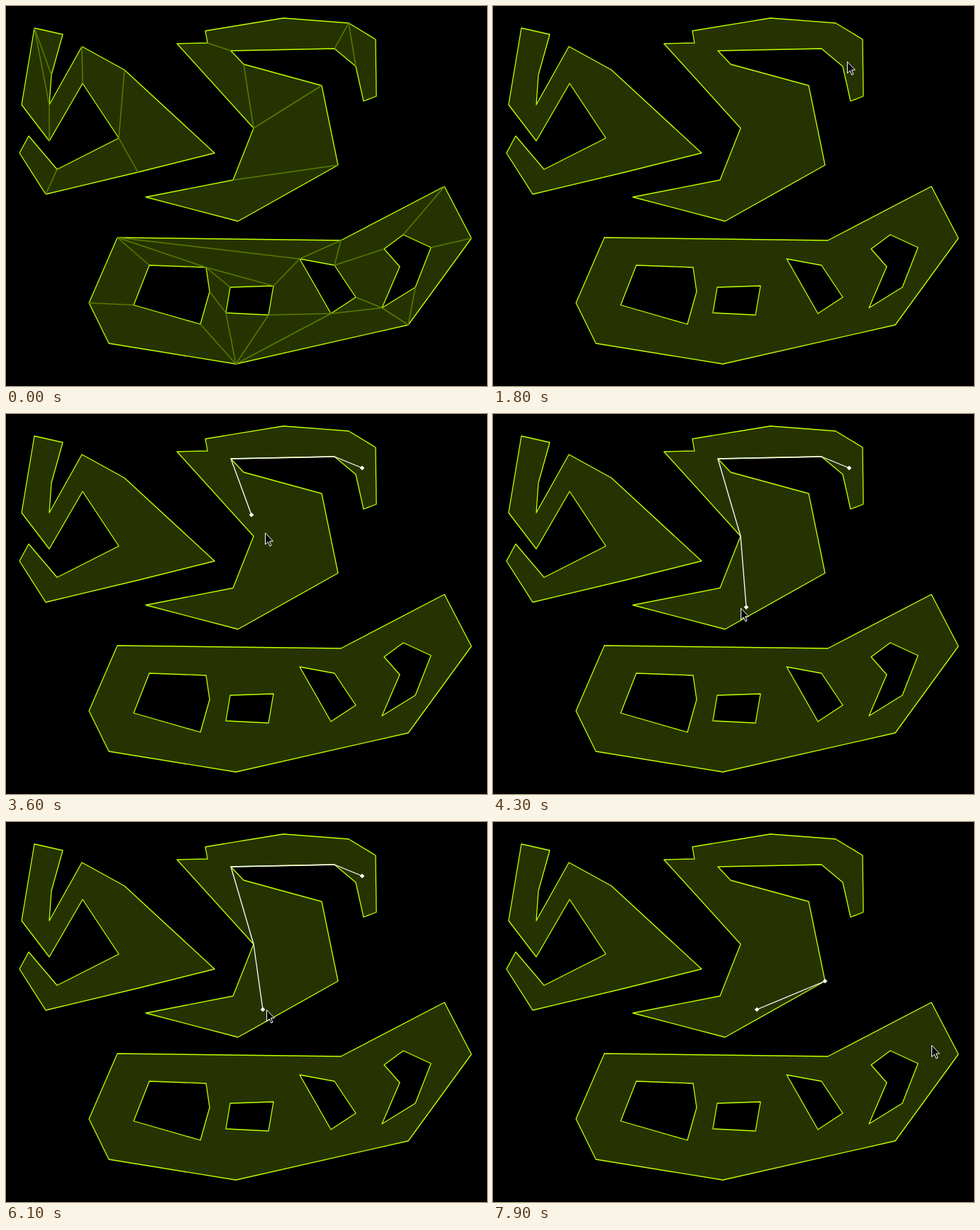
An HTML page that plays this animation: 678x535 px, repeating every 8 s.

```html
<!DOCTYPE html>
<html lang="en">
<head>
<meta charset="utf-8">
<title>Navigation mesh</title>
<style>
  html, body { margin: 0; width: 100%; height: 100%; overflow: hidden; background: #000; }
  svg { display: block; width: 678px; height: 535px; }
  #areas { fill: #263300; fill-rule: evenodd; stroke: #bfff00; stroke-width: 1.3; stroke-linejoin: round; }
  #seams { fill: none; stroke: #5a7c02; stroke-width: 1.5; }
  #route { fill: none; stroke: #fff; stroke-width: 1.3; stroke-linejoin: round; }
  .dot { fill: #fff; }
  #cursor { fill: #000; stroke: #fff; stroke-linejoin: round; }
</style>
</head>
<body>
<svg viewBox="0 0 678 535">
  <rect width="678" height="535"/>
  <path id="areas"/>
  <path id="seams"/>
  <path id="route"/>
  <path class="dot" id="from" d="M0-3.3L3.3 0 0 3.3-3.3 0Z"/>
  <path class="dot" id="to" d="M0-3.3L3.3 0 0 3.3-3.3 0Z"/>
  <path id="cursor" d="M.5.5V16.7L4.2 13.1 6.8 19 9 18 6.5 12.1H11.4Z"/>
</svg>
<script>
const STEP = 100, STEPS = 80;
const $ = id => document.getElementById(id);
const parse = s => s.split(' ').map(p => p.split(',').map(Number));
const line = pts => 'M' + pts.map(p => p.map(v => +v.toFixed(2)).join(' ')).join('L');

// Each area: outline and holes, then seams that name its points by letter.
const LETTERS = 'abcdefghijklmnopqrstuvwxyzA';
const areas = [
  ['40,31 80,40 64,97 61,139 107,57 167,90 294,207 186,234 56,265 19,207 32,183 72,230 159,186 108,109 61,190 22,139',
    'cado en fmh li'],
  ['241,53 284,52 281,35 391,17 483,24 521,47 522,127 504,134 493,85 463,60 317,63 335,82 445,112 468,224 327,303 197,269 320,245 349,172',
    'bk jei lrm qn'],
  ['157,326 472,330 618,254 656,327 567,449 324,504 145,475 117,418|202,365 282,368 287,402 274,448 180,421|316,396 377,394 370,435 310,432|414,356 463,365 493,410 458,433|560,322 599,340 577,396 530,425 555,367 533,342',
    'iajora jn kqfl fpuf rbsA vc wd xeyt uy hm'],
].map(([shape, seams]) => ({ rings: shape.split('|').map(parse), seams: seams.split(' ') }));
const named = (area, word) => [...word].map(c => area.rings.flat()[LETTERS.indexOf(c)]);

$('areas').setAttribute('d', areas.flatMap(a => a.rings.map(r => line(r) + 'Z')).join(''));
$('seams').setAttribute('d', areas.flatMap(a => a.seams.map(w => line(named(a, w)))).join(''));

const bend = areas[1].rings[0];
const edges = bend.map((p, i) => [p, bend[(i + 1) % bend.length]]);
const corners = named(areas[1], 'jkrq');

// pointer keys: step, x, y
const keys = parse('12,657,149 15,552,101 18,499,78 20,502,76 22,502,76 28,332,30 29,310,34 31,272,46 35,346,142 40,424,255 42,357,272 43,349,273 48,322,201 49,239,250 51,239,250 54,270,261 60,362,264 63,372,264 72,372,264 75,488,279 78,618,314');

const lerp = (a, b, t) => a + (b - a) * t;
const mix = (p, q, t) => [lerp(p[0], q[0], t), lerp(p[1], q[1], t)];
const dist = (p, q) => Math.hypot(p[0] - q[0], p[1] - q[1]);

const slope = (i, axis) => keys[i] && keys[i + 1]
  ? (keys[i + 1][axis] - keys[i][axis]) / (keys[i + 1][0] - keys[i][0]) : 0;

// speed at a key: harmonic mean of both sides, zero at rests and turns
function speed(i, axis) {
  const a = slope(i - 1, axis), b = slope(i, axis);
  return a * b > 0 ? 2 * a * b / (a + b) : 0;
}

function pointer(n) {
  const i = keys.findLastIndex(k => k[0] <= n);
  if (i < 0) return keys[0].slice(1);
  if (i === keys.length - 1) return keys[i].slice(1);
  const a = keys[i], b = keys[i + 1], h = b[0] - a[0], t = (n - a[0]) / h;
  return [1, 2].map(k => lerp(a[k], b[k], t * t * (3 - 2 * t))
    + h * t * (1 - t) * ((1 - t) * speed(i, k) - t * speed(i + 1, k)));
}

function inside([x, y]) {
  return edges.reduce((hit, [a, b]) =>
    (a[1] > y) !== (b[1] > y) && x < lerp(a[0], b[0], (y - a[1]) / (b[1] - a[1])) ? !hit : hit, false);
}

// nearest point of the area
function clamp(p) {
  if (inside(p)) return p;
  const nearest = edges.map(([a, b]) => {
    const dx = b[0] - a[0], dy = b[1] - a[1];
    const t = ((p[0] - a[0]) * dx + (p[1] - a[1]) * dy) / (dx * dx + dy * dy);
    return mix(a, b, Math.min(1, Math.max(0, t)));
  });
  return nearest.reduce((m, q) => dist(p, q) < dist(p, m) ? q : m);
}

function crosses(p, q, [a, b]) {
  const rx = q[0] - p[0], ry = q[1] - p[1], sx = b[0] - a[0], sy = b[1] - a[1];
  const den = rx * sy - ry * sx;
  if (Math.abs(den) < 1e-3) return false;
  const ox = a[0] - p[0], oy = a[1] - p[1];
  const within = t => t > 1e-4 && t < 1 - 1e-4;
  return within((ox * sy - oy * sx) / den) && within((ox * ry - oy * rx) / den);
}

function sees(p, q) {
  const mid = mix(p, q, .5);
  return dist(mid, clamp(mid)) < .5 && !edges.some(e => crosses(p, q, e));
}

// walk along the corners up to the first one that sees the goal
function findRoute(start, goal) {
  const stops = [start, ...corners];
  const i = stops.findIndex(p => sees(p, goal));
  return [...(i < 0 ? stops : stops.slice(0, i + 1)), goal];
}

const place = (el, [x, y]) => el.setAttribute('transform', `translate(${x.toFixed(2)} ${y.toFixed(2)})`);
const show = (id, on) => { $(id).style.display = on ? '' : 'none'; };

function draw(n) {
  show('seams', n < 5);
  show('cursor', n >= 12);
  place($('cursor'), pointer(n).map(Math.round));

  const active = n >= 21;
  for (const id of ['route', 'from', 'to']) show(id, active);
  if (!active) return;
  // a click sets the start; the route trails the pointer by one step
  const start = pointer(n < 71 ? 20 : 70);
  const goal = clamp(pointer(n - 1));
  $('route').setAttribute('d', line(findRoute(start, goal)));
  place($('from'), start);
  place($('to'), goal);
}

const t0 = performance.now();
function tick() {
  draw(Math.floor((performance.now() - t0) / STEP) % STEPS);
  requestAnimationFrame(tick);
}
tick();
</script>
</body>
</html>
```
